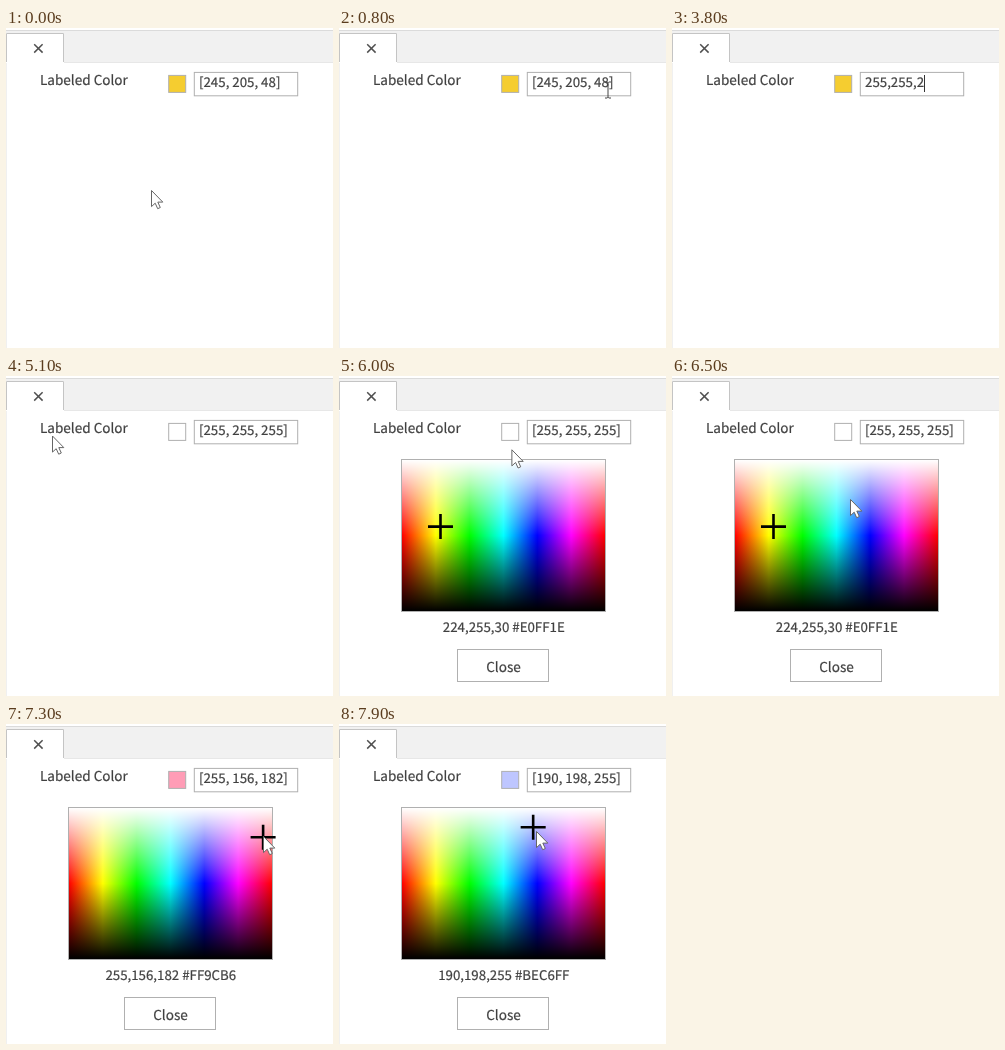
An HTML page for the animation above (8 s loop, 327 by 320 pixels).

```html
<!DOCTYPE html>
<html lang="en">
<head>
<meta charset="utf-8">
<title>Color field</title>
<style>
  html, body { margin: 0; width: 100%; height: 100%; overflow: hidden; background: #fff; }
  svg { display: block; width: 327px; height: 320px; }
  text {
    font: 13.3px "Noto Sans CJK SC", "Noto Sans CJK JP", "Noto Sans", sans-serif;
    fill: #404040; stroke: #404040; stroke-width: .2; white-space: pre;
    text-rendering: geometricPrecision;
  }
  .label { font-size: 13.55px; }
  .mid { text-anchor: middle; }
  .box { fill: #fff; stroke: #b0b0b0; }
  .thin { fill: none; stroke: #c4c4c4; }
</style>
</head>
<body>
<svg viewBox="0 0 327 320">
  <defs>
    <linearGradient id="hues"></linearGradient>
    <linearGradient id="light" x2="0" y2="1">
      <stop offset="0" stop-color="#fff"/>
      <stop offset=".5" stop-color="#fff" stop-opacity="0"/>
      <stop offset=".5" stop-color="#000" stop-opacity="0"/>
      <stop offset="1" stop-color="#000"/>
    </linearGradient>
  </defs>

  <!-- tab strip -->
  <rect y="3" width="327" height="31" fill="#f1f1f1"/>
  <path class="thin" d="M0 2.5H327" stroke-opacity=".6"/>
  <path class="thin" d="M57 34.5H327" stroke-opacity=".4"/>
  <path class="thin" d="M.5 35V320" stroke-opacity=".25"/>
  <rect y="5" width="58" height="30" fill="#fff"/>
  <path class="thin" d="M.5 34V5.5H57.5V34"/>
  <path d="M28.2 16.2l8.4 8.4m0-8.4l-8.4 8.4" stroke="#505050" stroke-width="1.5"/>

  <!-- labelled field -->
  <text class="label" x="34" y="57.2">Labeled Color</text>
  <rect id="swatch" class="box" x="162.7" y="47.4" width="17" height="17"/>
  <rect class="box" x="188.3" y="44.4" width="103.4" height="23.4"/>
  <rect id="selection" y="47" height="18" fill="#0078d7"/>
  <text id="value" x="193" y="59"></text>
  <rect id="caret" y="47" width="1" height="17" fill="#333"/>

  <!-- picker -->
  <g id="picker">
    <rect x="63" y="84" width="203" height="151" fill="url(#hues)"/>
    <rect x="63" y="84" width="203" height="151" fill="url(#light)"/>
    <rect x="62.5" y="83.5" width="204" height="152" fill="none" stroke="#b0b0b0"/>
    <path id="cross" d="M-12.5 0h25M0 -12.5v25" stroke="#000" stroke-width="2.6"/>
    <text id="readout" class="mid" x="164.8" y="255.5"></text>
    <rect class="box" x="118.5" y="273.5" width="91" height="32"/>
    <text class="label mid" x="164.5" y="296">Close</text>
  </g>

  <path id="arrow" d="M.5 .5V16.6L4.2 13.2 6.7 18.7 9.3 17.5 6.8 12.1H11.8Z"
        fill="#fff" stroke="#666"/>
  <path id="beam" d="M-3 -8h2.2l.8 .8 .8 -.8h2.2M0 -7.2v14.4M-3 8h2.2l.8 -.8 .8 .8h2.2"
        fill="none" stroke="#444"/>
</svg>

<script>
const LOOP = 8000, STEP = 100;
const FIELD = { x: 63, y: 84, w: 203, h: 151 };
const TEXT_X = 193, OLD_COLOR = [245, 205, 48], TYPED = "255,255,255";
const TYPE_START = 2000, KEY_TIME = 220, COMMIT = 4500;
const DRAG_START = 1100, DRAG_END = 1800, RETURN = 5000;
const PICKER_OPEN = 5900, PICK = 6800;
const $ = id => document.getElementById(id);

// time, x, y
const selectPath = [[0, 145, 162], [800, 269, 62], [DRAG_START, 291, 59], [1700, 34, 42]];
const pickPath = [
  [RETURN, 4, 63], [5100, 46, 59.5], [5800, 171, 61],
  [6500, 178, 123], [7300, 257, 112], [7400, 257, 112], [7900, 197, 107]
];
// time, hue, lightness
const picks = [[6500, 204, .74], [7300, 344.24, .80588], [7400, 344.24, .80588], [7900, 232.615, .87255]];
const preset = [68.267, .55882];

const smooth = p => p * p * (3 - 2 * p);

function track(keys, t) {
  const i = keys.findIndex(k => k[0] > t);
  if (i <= 0) return keys.at(i).slice(1);
  const [t0, x0, y0] = keys[i - 1], [t1, x1, y1] = keys[i];
  const p = smooth((t - t0) / (t1 - t0));
  return [x0 + (x1 - x0) * p, y0 + (y1 - y0) * p];
}

function toRgb([hue, light]) {
  const chroma = 1 - Math.abs(2 * light - 1);
  return [0, 8, 4].map(n => {
    const k = (n + hue / 30) % 12;
    const c = light - chroma / 2 * Math.max(-1, Math.min(k - 3, 9 - k, 1));
    return Math.round(c * 255);
  });
}

const toHex = rgb => "#" + rgb.map(c => c.toString(16).padStart(2, "0")).join("").toUpperCase();
const show = (node, on) => node.setAttribute("visibility", on ? "visible" : "hidden");
const move = (node, x, y) => node.setAttribute("transform", `translate(${x} ${y})`);

function drawPicker(t) {
  const pick = t < PICK ? preset : track(picks, t);
  const rgb = toRgb(pick);
  show($("picker"), t >= PICKER_OPEN);
  move($("cross"), FIELD.x + FIELD.w * pick[0] / 360, FIELD.y + FIELD.h * (1 - pick[1]));
  $("readout").textContent = `${rgb.join(",")} ${toHex(rgb)}`;
}

function fieldColor(t) {
  if (t < COMMIT) return OLD_COLOR;
  return t < PICK ? [255, 255, 255] : toRgb(track(picks, t));
}

function drawField(t) {
  const typing = t >= TYPE_START && t < COMMIT;
  const selecting = t >= DRAG_START && t < TYPE_START;
  const rgb = fieldColor(t), value = $("value");
  value.textContent = typing
    ? TYPED.slice(0, 1 + Math.floor((t - TYPE_START) / KEY_TIME))
    : `[${rgb.join(", ")}]`;
  $("swatch").style.fill = toHex(rgb);

  const end = TEXT_X + value.getComputedTextLength();
  show($("caret"), typing);
  $("caret").setAttribute("x", Math.round(end - .5));

  const from = Math.max(TEXT_X, Math.min(end, track(selectPath, t)[0]));
  $("selection").setAttribute("x", from);
  $("selection").setAttribute("width", selecting ? end - from : 0);
  value.style.fill = value.style.stroke = selecting && from === TEXT_X ? "#fff" : "";
}

function drawPointer(t) {
  const [x, y] = track(t < RETURN ? selectPath : pickPath, t);
  const visible = t < DRAG_END || t >= RETURN;
  const inside = x > 188 && x < 292 && y > 44 && y < 68;
  const beam = inside || (t >= DRAG_START && t < DRAG_END);
  show($("beam"), visible && beam);
  show($("arrow"), visible && !beam);
  move($("beam"), x, y);
  move($("arrow"), x, y);
}

$("hues").innerHTML = Array.from({ length: 7 }, (_, i) =>
  `<stop offset="${i / 6}" stop-color="hsl(${i * 60 % 360},100%,50%)"/>`).join("");

const begin = performance.now();
function frame(now) {
  const t = Math.floor(Math.max(0, now - begin) % LOOP / STEP) * STEP;
  drawField(t);
  drawPicker(t);
  drawPointer(t);
  requestAnimationFrame(frame);
}
frame(begin);
</script>
</body>
</html>
```
